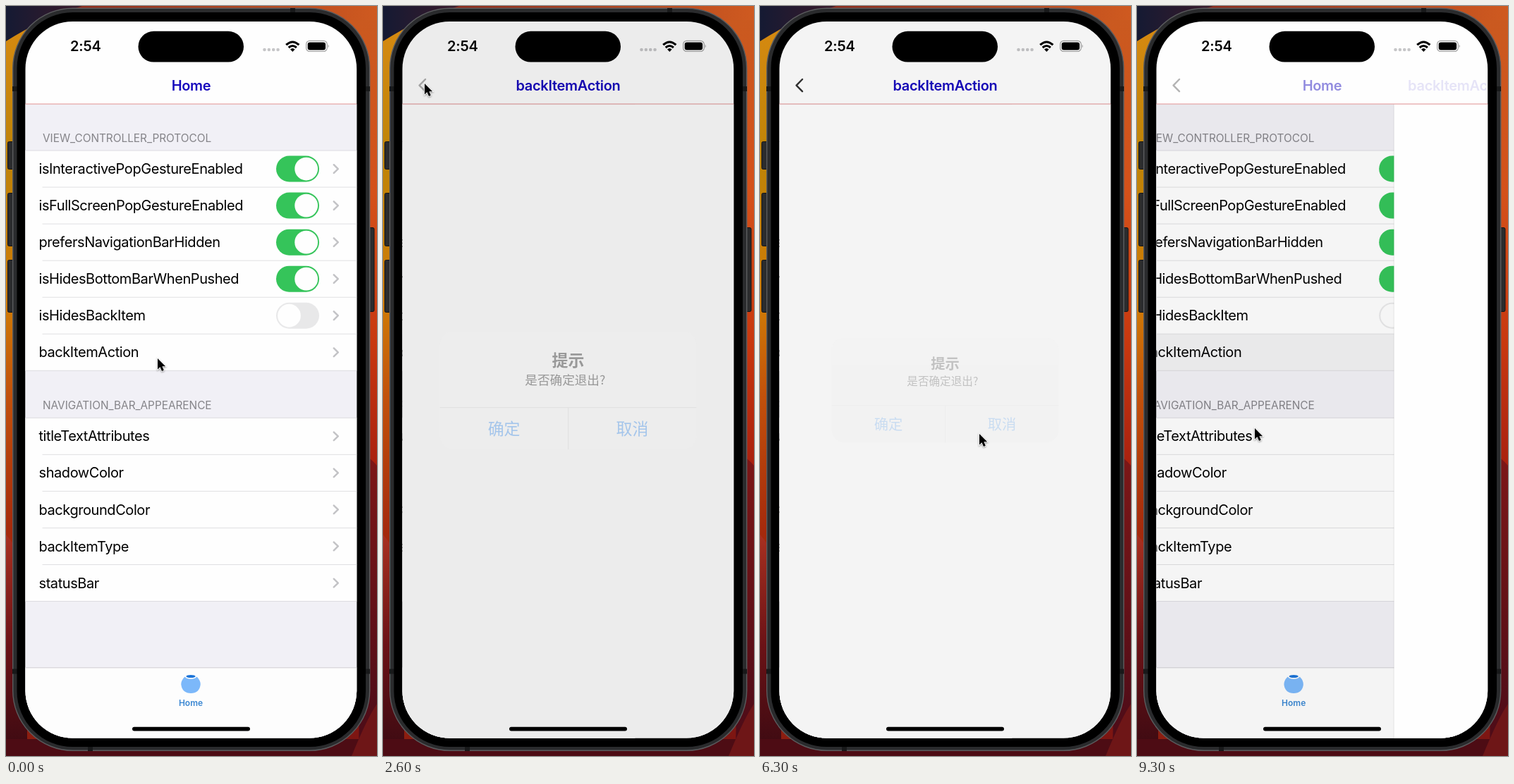
Write an HTML page that moves like this. It is 526 by 1064 pixels and loops after 9.4 s.

```html
<!DOCTYPE html>
<html lang="zh-CN">
<head>
<meta charset="utf-8">
<title>backItemAction</title>
<style>
html, body { margin: 0; width: 100%; height: 100%; overflow: hidden; background: #000; }
svg { display: block; width: 100vw; height: 100vh; }
text { font-family: Inter, "Noto Sans CJK SC", "Noto Sans CJK", sans-serif; }
.row { font-size: 20px; letter-spacing: -.43px; }
.head { font-size: 15.4px; letter-spacing: -.03px; fill: #858489; }
.title { font-size: 20px; font-weight: 600; letter-spacing: -.3px; fill: #1709bd; text-anchor: middle; }
#alert text { font-family: "Noto Sans CJK SC", "Noto Sans CJK", sans-serif; text-anchor: middle; }
.chev { fill: none; stroke: #c3c3c6; stroke-width: 2.5; stroke-linecap: round; stroke-linejoin: round; }
</style>
</head>
<body>
<svg viewBox="0 0 526 1064" preserveAspectRatio="none">
  <defs>
    <clipPath id="screen"><rect x="27.5" y="22" width="469.7" height="1016.5" rx="67"/></clipPath>
    <clipPath id="body"><rect x="27" y="139.3" width="471" height="900"/></clipPath>
    <linearGradient id="left" x2="0" y2="1">
      <stop offset="0" stop-color="#d98a12"/><stop offset=".2" stop-color="#bf8407"/>
      <stop offset=".4" stop-color="#cf7a06"/><stop offset=".52" stop-color="#c2510b"/>
      <stop offset=".7" stop-color="#a52a0c"/><stop offset="1" stop-color="#8a1c10"/>
    </linearGradient>
    <linearGradient id="right" x2="0" y2="1">
      <stop offset="0" stop-color="#c95a20"/><stop offset=".25" stop-color="#d4511a"/>
      <stop offset=".45" stop-color="#c8380f"/><stop offset=".62" stop-color="#a8200f"/>
      <stop offset="1" stop-color="#7a1512"/>
    </linearGradient>
    <linearGradient id="low" x2="0" y2="1">
      <stop offset="0" stop-color="#a83020"/><stop offset=".5" stop-color="#6b1216"/><stop offset="1" stop-color="#3a0a12"/>
    </linearGradient>
    <linearGradient id="lowRight" x2="0" y2="1">
      <stop offset="0" stop-color="#7d1717"/><stop offset="1" stop-color="#4a0b18"/>
    </linearGradient>
    <linearGradient id="top"><stop offset="0" stop-color="#8a2a1c"/><stop offset="1" stop-color="#cf5a20"/></linearGradient>
    <linearGradient id="night"><stop offset="0" stop-color="#151a33"/><stop offset="1" stop-color="#3a1a2a"/></linearGradient>
  </defs>

  <!-- wallpaper -->
  <rect width="263" height="1064" fill="url(#left)"/>
  <rect x="263" width="263" height="1064" fill="url(#right)"/>
  <rect x="90" width="436" height="20" fill="url(#top)"/>
  <path d="M0 0H108Q50 18 0 50Z" fill="url(#night)"/>
  <path d="M0 750Q14 765 30 800V1064H0Z" fill="url(#low)"/>
  <path d="M505 636Q516 640 526 652V1064H500Z" fill="url(#lowRight)"/>
  <path d="M0 1040H526V1064H0Z" fill="#4d0c14"/>
  <path d="M526 990Q512 1010 490 1064H526Z" fill="#6e1617"/>

  <!-- phone -->
  <g fill="#2b2c2e" stroke="#151516">
    <rect x="2.5" y="192.5" width="9" height="39" rx="2"/>
    <rect x="2.5" y="265.5" width="9" height="75" rx="2"/>
    <rect x="2.5" y="360.5" width="9" height="74" rx="2"/>
    <rect x="513" y="314.5" width="9" height="119" rx="2"/>
  </g>
  <rect x="9.7" y="3.2" width="506" height="1053" rx="85" fill="#2a2b2d" stroke="#5b5c5e" stroke-width="1.4"/>
  <path d="M9 117.5H16M9 944H16M510 117.5H516M510 944H516M406.5 3V9M119.5 1050V1057" stroke="#18191a" stroke-width="7"/>
  <rect x="15.5" y="9" width="494.5" height="1042" rx="79" fill="#000"/>

  <g clip-path="url(#screen)">
    <rect x="27" y="22" width="471" height="1017" fill="#fefefe"/>
    <g clip-path="url(#body)">
      <g id="home">
        <rect x="27" y="139" width="471" height="900" fill="#f1f0f6"/>
        <g id="rows"></g>
        <rect x="27" y="938.5" width="471" height="101" fill="#fdfdfd"/>
        <path d="M27 938.8H498" stroke="#cfced3"/>
        <path d="M253 952Q262 947 271 952Q276 957 275.7 963Q274 975 262 975Q250 975 248.3 963Q248 957 253 952Z" fill="#7cb8fa"/>
        <ellipse cx="262" cy="951.3" rx="8.2" ry="3.4" fill="#fdfdfd"/>
        <ellipse cx="262" cy="951" rx="6.6" ry="2" fill="#1c74d8"/>
        <text x="262" y="993" font-size="12" font-weight="600" fill="#3a87d2" text-anchor="middle">Home</text>
        <rect id="shade" x="27" y="139" width="471" height="900"/>
      </g>
      <g id="page">
        <rect x="27.5" y="139" width="471" height="900" fill="#fefefe"/>
        <path d="M27.2 139V1039" stroke="#000" stroke-opacity=".08"/>
      </g>
    </g>
    <path d="M27 139H498" stroke="#e08f90"/>
    <text id="homeTitle" class="title" x="262.5" y="119.7">Home</text>
    <text id="pageTitle" class="title" x="262.5" y="119.7">backItemAction</text>
    <path id="back" d="M60 104L51.6 112.6L60 121.2" fill="none" stroke="#333" stroke-width="2.5" stroke-linecap="round" stroke-linejoin="round"/>

    <!-- status bar -->
    <text x="112.8" y="64.3" font-size="20" font-weight="600" letter-spacing="-.15" text-anchor="middle">2:54</text>
    <path d="M366.5 62H386" stroke="#c6c6c8" stroke-width="4.6" stroke-linecap="round" stroke-dasharray="0 6.35"/>
    <g fill="none" stroke="#000" stroke-width="3.1">
      <path d="M397.2 55.2Q406.3 46.8 415.4 55.2"/>
      <path d="M400.7 59Q406.3 54 411.9 59"/>
    </g>
    <path d="M406.3 65L403 61.6Q406.3 58.6 409.6 61.6Z"/>
    <rect x="425.6" y="49.3" width="29.6" height="15.2" rx="5" fill="none" stroke="#a2a2a2" stroke-width="1.2"/>
    <rect x="427.7" y="51.4" width="25.4" height="11" rx="3.2"/>
    <path d="M456.6 54.2Q459 57 456.6 59.6Z" fill="#a2a2a2"/>

    <rect id="dim" x="27" y="22" width="471" height="1017"/>
    <g id="alert">
      <rect x="101.5" y="471" width="322" height="148.3" rx="17" fill="#efefef"/>
      <path id="ok" d="M101.5 567H262.5V619.3H118.5Q101.5 619.3 101.5 602.3Z" fill="#d8d8d8"/>
      <path id="cancel" d="M262.5 567H423.5V602.3Q423.5 619.3 406.5 619.3H262.5Z" fill="#d8d8d8"/>
      <path d="M101.5 566.8H423.5M262.6 567V619.3" stroke="#cfcfcf"/>
      <text x="262.5" y="514.5" font-size="20.3" font-weight="700">提示</text>
      <text x="258.8" y="538.3" font-size="15.6">是否确定退出?</text>
      <g font-size="20.3" fill="#2480ea">
        <text x="182" y="601">确定</text>
        <text x="343" y="601">取消</text>
      </g>
    </g>
    <rect x="187.5" y="35.8" width="149.5" height="43.8" rx="21.9"/>
    <rect x="179" y="1022.7" width="167" height="5.8" rx="2.9"/>
  </g>
  <path id="cursor" d="M0 0V15.6L3.5 12.2L6 18L8.8 16.8L6.4 11.2H11.2Z" stroke="#fff" stroke-width="1.6" paint-order="stroke" style="filter:drop-shadow(0 1.5px 1.2px #0006)"/>
</svg>

<script>
const LOOP = 9400, FRAME = 100;
const PUSH = 450, POP = 9090;
// each alert: shown at, dismissed at
const ALERTS = [[2517, 6100], [7400, 8690]];
// cursor stops: time, x, y
const PATH = [
  [0, 215, 500], [600, 215, 500], [1200, 188, 342], [1500, 182, 318], [2300, 59, 110],
  [2680, 59, 110], [3400, 223, 618], [3800, 230, 624], [5300, 230, 624], [5950, 311, 607],
  [6450, 311, 607], [7200, 53, 117], [7680, 53, 117], [8450, 167, 599], [LOOP, 167, 599]
];
const $ = id => document.getElementById(id);
const clamp = v => Math.max(0, Math.min(1, v));
const fade = (id, v) => $(id).setAttribute('opacity', v);
const move = (id, x, y = 0) => $(id).setAttribute('transform', `translate(${x} ${y})`);
const within = (t, a, b) => t >= a && t < b;

// critically damped spring, 0 to 1
function spring(ms, speed) {
  const x = Math.max(0, ms) * speed / 1000;
  return 1 - (1 + x) * Math.exp(-x);
}

function toggle(y, on) {
  return `<rect x="383" y="${y - 18.5}" width="61" height="37" rx="18.5" fill="${on ? '#35c45a' : '#e8e8e9'}"/>
    <circle cx="${on ? 425.7 : 401.5}" cy="${y}" r="16.4" fill="#fefefe"/>`;
}

function section(top, title, labels, switches = []) {
  const step = 52.05, height = labels.length * step;
  let out = `<text class="head" x="52" y="${top - 12.3}">${title}</text>
    <rect x="27" y="${top}" width="471" height="${height}" fill="#fefefe"/>
    <path d="M27 ${top}H498M27 ${top + height}H498" stroke="#dcdbe0"/>`;
  labels.forEach((label, i) => {
    const y = top + (i + .5) * step;
    if (label === 'backItemAction')
      out += `<rect id="pressed" x="27" y="${y - step / 2}" width="471" height="${step}" fill="#d1d1d3"/>`;
    if (i) out += `<path d="M51.5 ${y - step / 2}H498" stroke="#e0e0e2"/>`;
    if (i in switches) out += toggle(y, switches[i]);
    out += `<text class="row" x="46.5" y="${y + 7.1}">${label}</text>
      <path class="chev" d="M464.8 ${y - 5.8}L470.8 ${y}L464.8 ${y + 5.8}"/>`;
  });
  return out;
}

$('rows').innerHTML =
  section(205, 'VIEW_CONTROLLER_PROTOCOL',
    ['isInteractivePopGestureEnabled', 'isFullScreenPopGestureEnabled', 'prefersNavigationBarHidden',
     'isHidesBottomBarWhenPushed', 'isHidesBackItem', 'backItemAction'], [1, 1, 1, 1, 0]) +
  section(584.3, 'NAVIGATION_BAR_APPEARENCE',
    ['titleTextAttributes', 'shadowColor', 'backgroundColor', 'backItemType', 'statusBar']);

function drawPages(t) {
  const popping = t >= POP;
  const p = popping ? 1 - spring(t - POP, 12) : spring(t - PUSH, 12);
  move('home', -140.7 * p);
  move('page', 470 * (1 - p));
  fade('shade', .13 * p);
  fade('pressed', popping ? p : +(t >= 300));
  move('pageTitle', 273 * (1 - p));
  fade('pageTitle', p ** 1.8);
  fade('homeTitle', (1 - p) ** 2.3);

  let back = p ** .8;
  for (const [shown] of ALERTS)
    if (within(t, shown - 150, shown + 350)) back = .2 + .8 * clamp((t - shown) / 350);
  fade('back', back);
}

function drawAlert(t) {
  let alpha = 0, scale = 1;
  for (const [shown, closed] of ALERTS) {
    if (!within(t, shown, closed + 400)) continue;
    const p = spring(t - shown, 15);
    alpha = p * (1 - spring(t - closed, 15));
    scale = 1.2 - .2 * p;
  }
  fade('dim', .2 * alpha);
  fade('alert', alpha);
  $('alert').setAttribute('transform', `translate(262.5 545.2) scale(${scale}) translate(-262.5 -545.2)`);
  fade('cancel', +within(t, 5990, 6150));
  fade('ok', +within(t, 8570, 8730));
}

function drawCursor(t) {
  const i = PATH.findIndex(k => k[0] > t);
  const [t0, x0, y0] = PATH[i - 1], [t1, x1, y1] = PATH[i];
  const u = (t - t0) / (t1 - t0), e = u * u * (3 - 2 * u);
  move('cursor', x0 + (x1 - x0) * e, y0 + (y1 - y0) * e);
}

const start = performance.now();
function draw(now) {
  const t = Math.floor(Math.max(0, now - start) % LOOP / FRAME) * FRAME;
  drawPages(t);
  drawAlert(t);
  drawCursor(t);
  requestAnimationFrame(draw);
}
draw(start);
</script>
</body>
</html>
```
